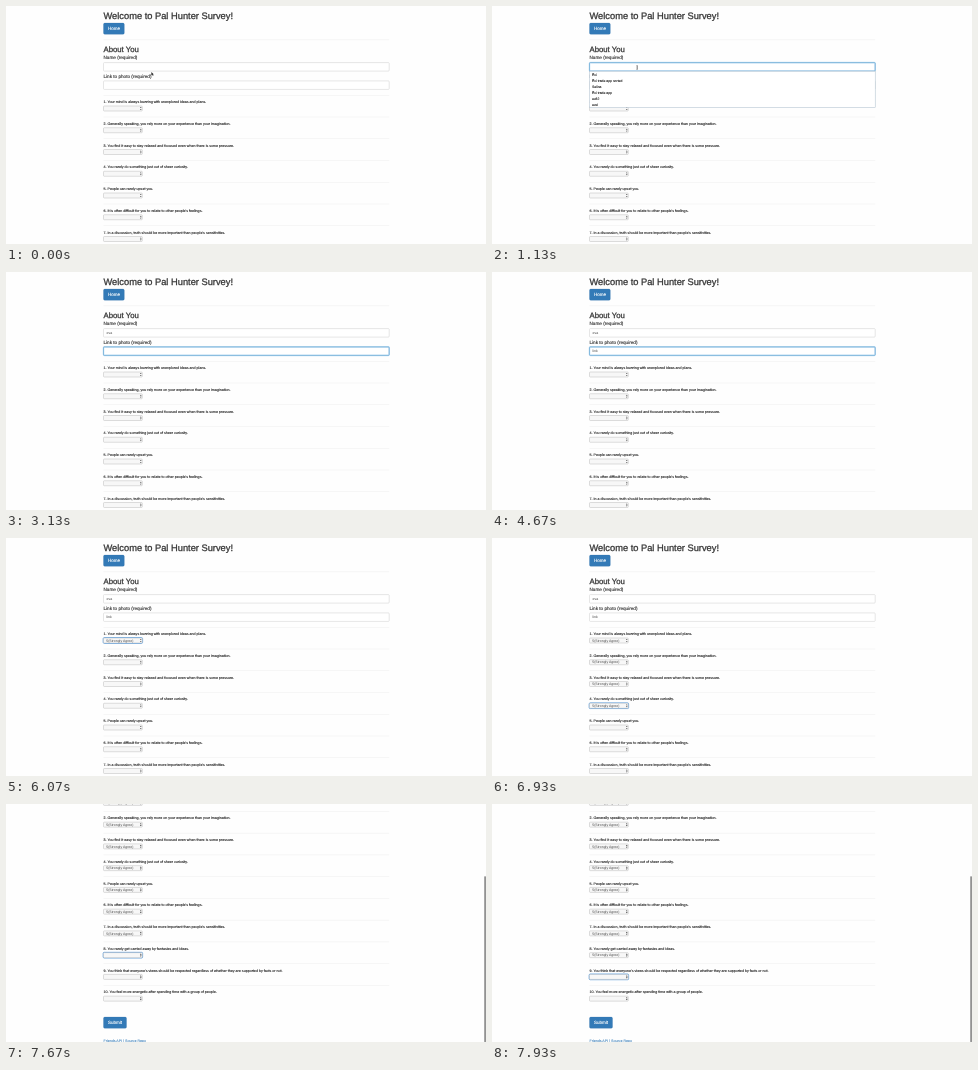
An HTML page that plays this animation: 480 by 238 pixels, repeating every 8 s.

```html
<!DOCTYPE html>
<html lang="en">
<head>
<meta charset="utf-8">
<title>Survey</title>
<style>
  html, body { margin: 0; width: 100%; height: 100%; overflow: hidden; background: #fefefe; }
  svg { display: block; width: 480px; height: 238px; }
  text {
    font-family: "Liberation Sans", Arial, sans-serif;
    text-rendering: geometricPrecision;
    fill: #333;
    white-space: pre;
  }
  .medium { stroke: #333; stroke-width: .13px; }
  .dark { fill: #1c1c1c; stroke: #1c1c1c; stroke-width: .1px; }
  .big { stroke-width: .26px; }
  .white { fill: #fff; stroke: #fff; stroke-width: .12px; }
  .link { fill: #337ab7; stroke: #337ab7; stroke-width: .06px; }
  .typed { fill: #444; }
  .rule { fill: #ececec; }
  .button { fill: #337ab7; stroke: #2e6da4; stroke-width: .25px; }
  .input { fill: #fff; stroke: #ccc; stroke-width: .5px; }
  .glow { fill: none; stroke: #66afe9; stroke-opacity: .35; stroke-width: 1.6px; }
  .focus { fill: none; stroke: #62a9d8; stroke-width: .6px; }
  .select { fill: #f7f7f7; stroke: #b4b4b4; stroke-width: .45px; }
  .ring { fill: none; stroke: #5b9fe0; stroke-width: 1px; }
  .menu { fill: #fff; stroke: #a9bccb; stroke-width: .5px; }
  .caret { fill: #222; }
</style>
</head>
<body>
<svg id="stage" viewBox="0 0 480 238"></svg>
<script>
const LOOP = 8000, LEFT = 97.5, WIDTH = 285.7, PITCH = 21.75, SCROLL = 103.6;
const svg = document.getElementById('stage');

function add(tag, attrs, parent, content) {
  const el = document.createElementNS('http://www.w3.org/2000/svg', tag);
  for (const key in attrs) el.setAttribute(key, attrs[key]);
  if (content !== undefined) el.textContent = content;
  parent.appendChild(el);
  return el;
}
const group = parent => add('g', {}, parent);
const text = (parent, x, y, size, cls, content) =>
  add('text', { x, y, 'font-size': size, class: cls }, parent, content);
const rect = (parent, x, y, width, height, cls, rx = 0) =>
  add('rect', { x, y, width, height, rx, class: cls }, parent);
const show = (el, on) => el.setAttribute('visibility', on ? 'visible' : 'hidden');

const page = group(svg);
const rule = y => rect(page, LEFT, y, WIDTH, .5, 'rule');

function button(y, width, label) {
  rect(page, LEFT, y, width, 11.2, 'button', 1.4);
  text(page, LEFT + 4.4, y + 7.2, 4.5, 'white', label);
}

function input(y) {
  rect(page, LEFT, y, WIDTH, 8.5, 'input', .9);
  const focus = group(page);
  rect(focus, LEFT, y, WIDTH, 8.5, 'glow', .9);
  rect(focus, LEFT, y, WIDTH, 8.5, 'focus', .9);
  const value = text(page, 100.5, y + 5.5, 3.5, 'typed', '');
  const caret = rect(page, 100.5, y + 2.4, .4, 4, 'caret');
  return { focus, value, caret };
}

function question(label, i) {
  const y = 96 + i * PITCH;
  rule(y - 7);
  text(page, LEFT, y + 1.2, 3.62, 'dark', `${i + 1}. ${label}`);
  const ring = rect(page, LEFT - .3, y + 3.7, 39.4, 5.6, 'ring', 1);
  rect(page, LEFT, y + 4, 38.8, 5, 'select', .8);
  add('path', {
    d: `M134 ${y + 6.1}l.8 -1.2l.8 1.2zM134 ${y + 6.9}l.8 1.2l.8 -1.2z`, fill: '#333'
  }, page);
  const value = text(page, 100.2, y + 7.7, 3.5, 'typed', '5(Strongly Agree)');
  return { ring, value };
}

text(page, LEFT, 13, 9.3, 'medium big', 'Welcome to Pal Hunter Survey!');
button(17.1, 20.8, 'Home');
rule(33.6);
text(page, LEFT, 45.8, 7.75, 'medium big', 'About You');
text(page, LEFT, 53.2, 4.65, 'medium', 'Name (required)');
const nameBox = input(56.6);
text(page, LEFT, 71.7, 4.65, 'medium', 'Link to photo (required)');
const linkBox = input(74.9);

const questions = [
  'Your mind is always buzzing with unexplored ideas and plans.',
  'Generally speaking, you rely more on your experience than your imagination.',
  'You find it easy to stay relaxed and focused even when there is some pressure.',
  'You rarely do something just out of sheer curiosity.',
  'People can rarely upset you.',
  'It is often difficult for you to relate to other people\'s feelings.',
  'In a discussion, truth should be more important than people\'s sensitivities.',
  'You rarely get carried away by fantasies and ideas.',
  'You think that everyone\'s views should be respected regardless of whether they are supported by facts or not.',
  'You feel more energetic after spending time with a group of people.'
].map(question);

button(316.7, 23, 'Submit');
text(page, LEFT, 341.8, 3.6, 'link', 'Friends API | Source Repo');

const menu = group(page);
rect(menu, LEFT, 65.2, WIDTH, 36.3, 'menu');
['Evi', 'Evi trade app sorted', 'Selina', 'Evi trade app', 'ev82', 'evsl'].forEach((item, i) =>
  text(menu, 100, 70.3 + i * 5.95, 3.4, 'dark', item));

const arrow = add('path', {
  d: 'M145.3 66v3.6l.9 -.8l.7 1.3l.6 -.3l-.6 -1.2h1.1z', fill: '#111', stroke: '#fff', 'stroke-width': .2
}, svg);
const beam = add('path', {
  d: 'M-.7 -2q.7 0 .7 .5v3q0 .5 -.7 .5M.7 -2q-.7 0 -.7 .5v3q0 .5 .7 .5',
  fill: 'none', stroke: '#333', 'stroke-width': .4
}, svg);
const bar = rect(svg, 478.2, SCROLL * 238 / (238 + SCROLL), 1.8, 165.8, '', .6);
bar.setAttribute('fill', '#929292');

const nameKeys = [1470, 1870, 2330], linkKeys = [3600, 3800, 4000, 4200];
const nameEnds = [0, 1.95, 3.7, 5.65], linkEnds = [0, .78, 1.56, 3.5, 5.25];
const focusAt = [5000, 6330, 6600, 6800, 7070, 7270, 7470, 7670, 7930];
const pickAt = [6070, 6470, 6670, 6930, 7130, 7330, 7530, 7730];

const ease = x => { x = Math.min(1, Math.max(0, x)); return x * x * (3 - 2 * x); };

function drawInput(box, t, from, to, word, keys, ends) {
  box.focus.setAttribute('opacity', ease((t - from) / 200) - ease((t - to) / 200));
  const n = keys.filter(k => k <= t).length;
  box.value.textContent = word.slice(0, n);
  box.caret.setAttribute('x', 100.6 + ends[n]);
  const last = n ? keys[n - 1] : from + 130;
  const blink = n ? 470 : 465;
  show(box.caret, t >= from + 70 && t < to && (t < last || Math.floor((t - last) / blink) % 2 === 0));
}

function draw(t) {
  drawInput(nameBox, t, 530, 2530, 'eva', nameKeys, nameEnds);
  drawInput(linkBox, t, 2530, 5000, 'link', linkKeys, linkEnds);
  show(menu, t >= 800 && t < 1530);

  show(arrow, t < 70);
  show(beam, t >= 70 && t < 1470);
  beam.setAttribute('transform', `translate(145.2 ${63.2 - 1.7 * ease((t - 330) / 200)})`);

  const active = focusAt.filter(f => f <= t).length - 1;
  questions.forEach((q, i) => {
    show(q.ring, i === active);
    show(q.value, t >= pickAt[i]);
  });

  const scrolled = t >= 7670;
  page.setAttribute('transform', `translate(0 ${scrolled ? -SCROLL : 0})`);
  show(bar, scrolled);
}

const start = performance.now();
function tick() {
  draw((performance.now() - start) % LOOP);
  requestAnimationFrame(tick);
}
tick();
</script>
</body>
</html>
```
